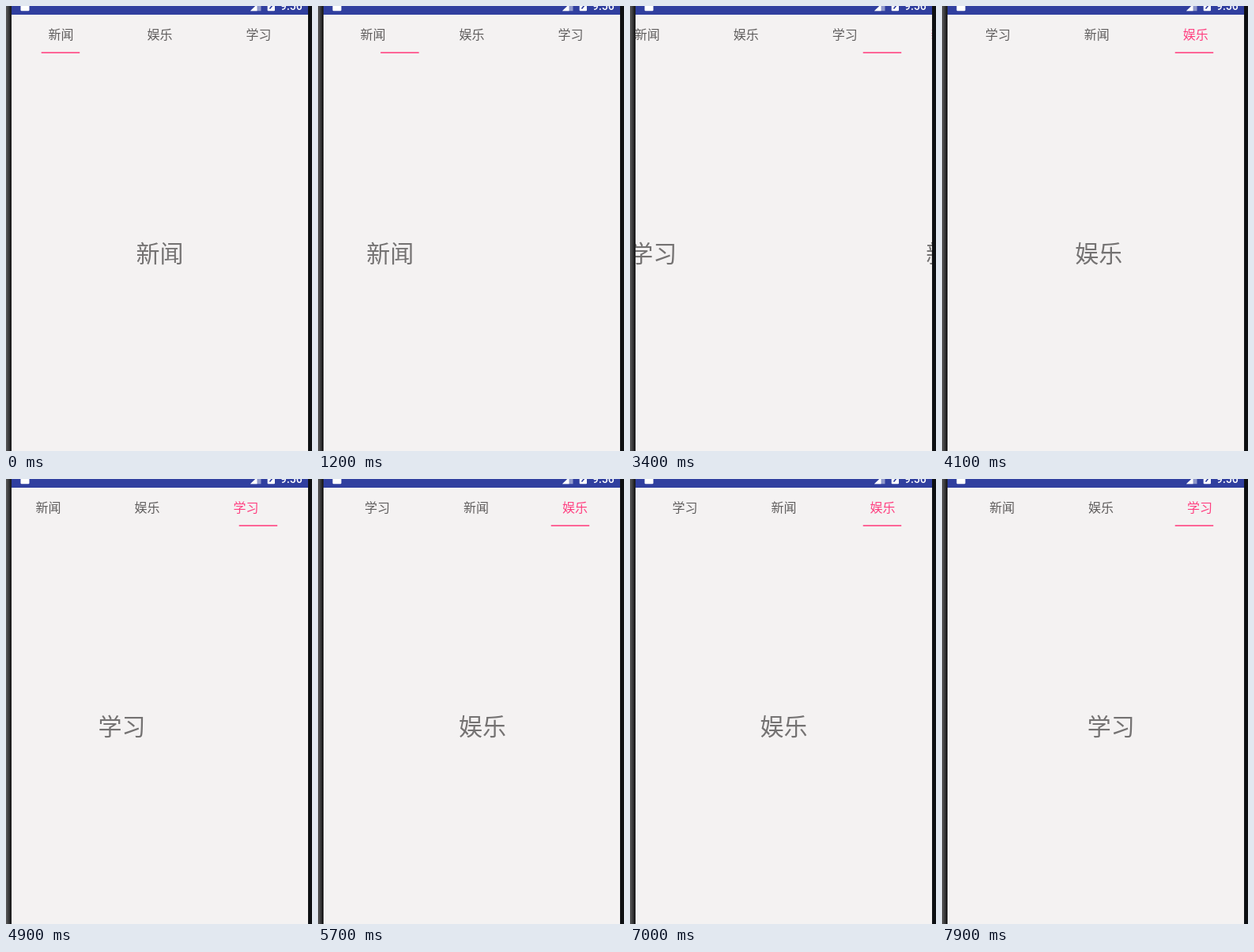
Recreate the animation shown at these times as an HTML page. Size 387x563 px, loop 8000 ms.

```html
<!DOCTYPE html>
<html lang="zh-CN">
<head>
<meta charset="utf-8">
<title>Looping tabs</title>
<style>
  html, body { margin: 0; width: 100%; height: 100%; overflow: hidden; background: #f4f2f2; }
  svg { display: block; width: 387px; height: 563px; }
  .cjk { font-family: "Noto Sans CJK SC", "Noto Sans CJK", sans-serif; text-anchor: middle; }
  .tab { font-size: 16px; }
  .page { font-size: 30px; fill: #747272; }
  .clock { font: 500 14px Roboto, sans-serif; fill: #fff; }
</style>
</head>
<body>
<svg viewBox="0 0 387 563">
  <defs>
    <linearGradient id="bezel">
      <stop offset="0" stop-color="#5a5a5b"/>
      <stop offset=".45" stop-color="#3c3c3d"/>
      <stop offset=".9" stop-color="#161617"/>
      <stop offset="1" stop-color="#2b2b2c"/>
    </linearGradient>
  </defs>
  <rect width="387" height="563" fill="#f4f2f2"/>
  <g id="pages"></g>
  <g id="tabs"></g>
  <rect id="bar" y="58" width="48.5" height="2" fill="#ff6698"/>
  <g id="status">
    <rect x="7" width="375" height="11" fill="#303f9f"/>
    <rect x="18.5" y="-5" width="11" height="11.3" rx="1.2" fill="#fff"/>
    <path d="M322.500-7V6.200H309z" fill="#8f98cb"/>
    <path d="M317.500-2V6.200H309z" fill="#fff"/>
    <rect x="330.700" y="-8" width="9.300" height="14.200" rx="1" fill="#fff"/>
    <path d="M337-1L333.500 3.500" stroke="#303f9f" stroke-width="1.600"/>
    <text class="clock" x="347" y="5">9:56</text>
  </g>
  <rect width="7" height="563" fill="url(#bezel)"/>
  <rect x="382" width="5" height="563" fill="#0d0f12"/>
</svg>
<script>
const LOOP = 8000, STEP = 100, SETTLE = 300, DRAGGED = 0.36;
const PAGE_W = 375, TAB_W = 125, LEFT = 7, LAST_SLOT = 2;
const TITLES = ["新闻", "娱乐", "学习"];

// Finger down, finger up, direction, lead of the page over the tabs in ms
const SWIPES = [
  [850, 1250, 1, 0], [1520, 1800, -1, 0], [2100, 2350, 1, 0],
  [2640, 2880, 1, 0], [3180, 3398, 1, 6], [3690, 3930, 1, 0],
  [4200, 4440, 1, 0], [4708, 5030, 1, 0], [5320, 5576, 1, 7],
  [5800, 6000, 1, 0], [6180, 6380, 1, 0], [6560, 6740, 1, 0],
  [7320, 7781, 1, 0]
];

const clamp = v => Math.max(0, Math.min(1, v));

// Slow drag, then a quintic ease-out after release
function progress(t, down, up) {
  if (t < up) return DRAGGED * clamp((t - down) / (up - down)) ** 2;
  return 1 - (1 - DRAGGED) * (1 - clamp((t - up) / SETTLE)) ** 5;
}

function position(t, useLead) {
  return SWIPES.reduce((sum, [down, up, dir, lead]) =>
    sum + dir * progress(t + (useLead ? lead : 0), down, up), 0);
}

function selectedIndex(t) {
  const done = SWIPES.filter(s => t >= s[1]);
  return done.length ? done.reduce((sum, s) => sum + s[2], 0) : -1;
}

function makeTexts(id, count, cls, y) {
  const group = document.getElementById(id);
  return Array.from({ length: count }, () => {
    const el = document.createElementNS("http://www.w3.org/2000/svg", "text");
    el.setAttribute("class", "cjk " + cls);
    el.setAttribute("y", y);
    return group.appendChild(el);
  });
}

const tabs = makeTexts("tabs", 4, "tab", 41.5);
const pages = makeTexts("pages", 2, "page", 324.4);
const bar = document.getElementById("bar");

function place(texts, pos, width, paint) {
  const first = Math.floor(pos + 1e-4);
  texts.forEach((el, k) => {
    const i = first + k;
    el.textContent = TITLES[i % TITLES.length];
    el.setAttribute("x", LEFT + width * (i - pos + 0.5));
    if (paint) el.setAttribute("fill", paint(i));
  });
}

function draw(t) {
  const pos = position(t, false);
  const selected = selectedIndex(t);
  place(tabs, Math.max(0, pos - LAST_SLOT), TAB_W, i => i === selected ? "#ff4081" : "#605e5e");
  place(pages, Math.max(0, position(t, true)), PAGE_W);
  bar.setAttribute("x", 44.7 + TAB_W * Math.min(pos, LAST_SLOT));
}

const start = performance.now();
function tick() {
  const t = (performance.now() - start) % LOOP;
  draw(Math.floor(t / STEP) * STEP);
  requestAnimationFrame(tick);
}
tick();
</script>
</body>
</html>
```
